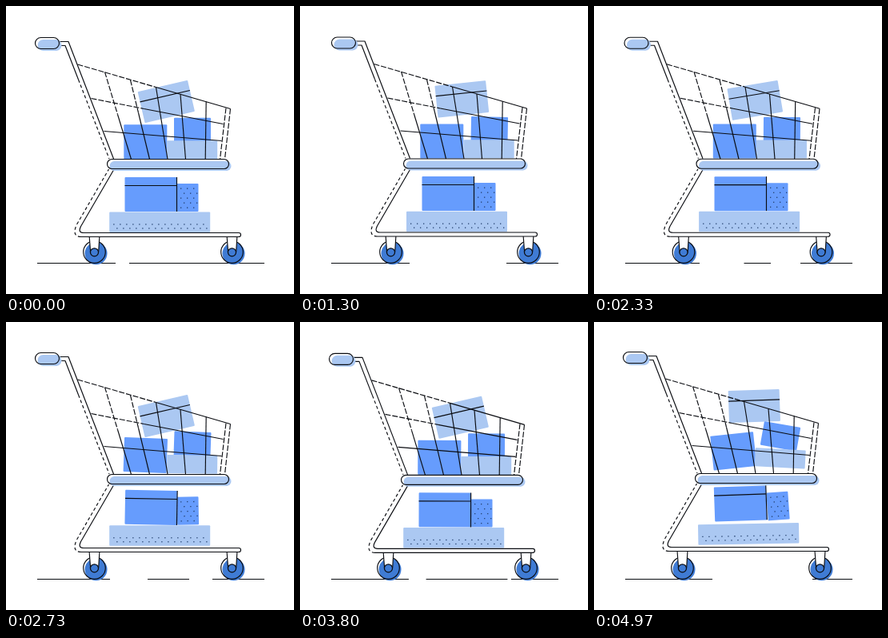
Recreate the animation shown at these times as an HTML page with a canvas. Size 360x360 px, loop 5 s.

```html
<!DOCTYPE html>
<html>
<head>
<meta charset="utf-8">
<style>
html, body { margin: 0; height: 100%; overflow: hidden; background: #fff }
canvas { display: block; width: 360px; height: 360px }
</style>
</head>
<body>
<canvas id="stage" width="360" height="360"></canvas>
<script>
const g = document.getElementById('stage').getContext('2d');
const INK = '#0b0d12', LIGHT = '#abc8f2', MID = '#669cfd', DARK = '#3f7bd4';
const LOOP = 5000, STEP = 40, CYCLE = 24;
const KEYS = [0, 4, 8, 12, 18, 20, 24];
const DASH = [7, 2], DOTTED = [4, 3];

// Eased value at beat b; each list has one value per key and wraps around
function tween(b, v) {
  let i = 0;
  while (b >= KEYS[i + 1]) i++;
  const u = (b - KEYS[i]) / (KEYS[i + 1] - KEYS[i]);
  const next = v[(i + 1) % v.length];
  return v[i] + (next - v[i]) * u * u * (3 - 2 * u);
}

// dx, dy and turn (degrees) follow the keys
const boxes = [
  { x: 200.3, y: 119.5, w: 64, h: 40, fill: LIGHT, strap: -7,
    dx: [0, 0, -1, 0, 0, 0], dy: [0, -14.5, -3.2, 0, -3, -2], turn: [-13, -2, -6, -13, -13, -13] },
  { x: 174.3, y: 169.8, w: 54, h: 43, fill: MID,
    dx: [0, 0, 0, 0, 0, 0], dy: [0, -8.5, -.7, -.7, -4.2, -3.3], turn: [0, -6, 0, 0, 3, 2] },
  { x: 233, y: 154.8, w: 46, h: 30, fill: MID,
    dx: [0, 0, .8, 0, .3, 0], dy: [0, -12, -1.3, -.5, -3.5, -2.7], turn: [0, 10, 1, 0, 3, 2] },
  { x: 232.7, y: 179.8, w: 63, h: 23, fill: LIGHT,
    dx: [0, 0, .5, 0, -.5, 0], dy: [0, -9.5, -1, -.5, -3, -2], turn: [0, 3, 0, 0, 1, .7] },
  { x: 192.2, y: 270.3, w: 126, h: 25.5, fill: LIGHT, dots: [[-58, 2], [-54, 7]], count: 15,
    dx: [0, 1, .8, 0, 0, 0], dy: [0, -5.5, -.8, -.7, -3.5, -3.2], turn: [0, -1, 0, 0, 0, 0] },
  { x: 227, y: 239.5, w: 27, h: 35, fill: MID, dots: [[-9, -12], [-5, -6], [-9, 0], [-5, 6], [-9, 12]], count: 3,
    dx: [0, 3, 1, 0, .5, .3], dy: [0, -9.5, -1, -.7, -4.5, -3.5], turn: [0, -4, 0, 0, -2, -1] },
  { x: 181, y: 235.5, w: 65, h: 43, fill: MID, strap: -11, edge: true,
    dx: [0, 2, 1, 0, .5, .3], dy: [0, -8.5, -1, -.7, -4.5, -3.6], turn: [0, -2, 0, 0, 2, 1] }
];
const shiftX = [0, 0, 3, 0, 0, 0];
const lift = [0, -2, -.5, 0, -1, -1];
const ground = {
  leftEnd: [137, 148, 137, 127, 124, 130],
  midStart: [154, 210, 210, 165, 203, 177],
  midEnd: [265, 210, 210, 232, 203, 229],
  rightStart: [265, 273, 258, 258, 273, 258]
};

function line(points, dash = [], width = 1.15) {
  g.beginPath();
  points.forEach(([x, y]) => g.lineTo(x, y));
  g.setLineDash(dash);
  g.lineWidth = width;
  g.stroke();
  g.setLineDash([]);
}

function shape(path, fill, stroke) {
  g.beginPath();
  path();
  if (fill) { g.fillStyle = fill; g.fill(); }
  if (stroke) { g.lineWidth = 1.15; g.stroke(); }
}

const circle = (x, y, r, fill, stroke) => shape(() => g.arc(x, y, r, 0, 7), fill, stroke);

function pill(x, y, w, h) {
  const body = () => g.roundRect(x, y, w, h, h / 2);
  shape(body, '#fff');
  shape(() => g.roundRect(x + 3, y + 2.5, w, h, h / 2), LIGHT);
  shape(body, null, true);
}

function drawBox(o, b) {
  const { w, h } = o;
  g.save();
  g.translate(o.x + tween(b, o.dx), o.y + tween(b, o.dy));
  g.rotate(tween(b, o.turn) * Math.PI / 180);
  shape(() => g.roundRect(-w / 2, -h / 2, w, h, 1), o.fill);
  if (o.strap) line([[-w / 2, o.strap], [w / 2, o.strap]]);
  if (o.edge) line([[w / 2, -h / 2], [w / 2, h / 2]]);
  g.fillStyle = '#24406e';
  for (const [x, y] of o.dots || [])
    for (let i = 0; i < o.count; i++)
      if (x + i * 8 < w / 2 - 2) g.fillRect(x + i * 8, y, 1.3, 1.3);
  g.restore();
}

function drawWheel(x) {
  circle(x + 2, 309.3, 14, DARK);
  circle(x, 307.5, 13.8, null, true);
  shape(() => {
    g.moveTo(x - 6.5, 286);
    g.lineTo(x - 5, 306);
    g.arc(x, 307, 5.2, Math.PI, 0, true);
    g.lineTo(x + 6.5, 286);
  }, '#fff', true);
  circle(x, 307.8, 5, DARK, true);
}

function drawLowerFrame() {
  const outer = () => {
    g.lineTo(94, 288.5);
    g.quadraticCurveTo(82, 288.5, 88, 274);
    g.lineTo(128.5, 204);
  };
  const inner = () => {
    g.lineTo(134.5, 205);
    g.lineTo(93.5, 275.5);
    g.quadraticCurveTo(89.5, 283.5, 97, 283.5);
    g.lineTo(291, 283.5);
    g.arc(291, 286, 2.5, -Math.PI / 2, Math.PI / 2);
    g.lineTo(94, 288.5);
  };
  shape(() => { inner(); outer(); }, '#fff');
  shape(inner, null, true);
  g.setLineDash(DOTTED);
  shape(outer, null, true);
  g.setLineDash([]);
}

function drawBasket() {
  g.save();
  g.translate(.5, .5);
  line([[89, 72.5], [187, 101]], DASH);
  line([[187, 101], [280, 128]]);
  line([[106, 115], [172, 128]], DASH);
  line([[172, 128], [271, 147]]);
  line([[122, 156], [269, 168]]);
  line([[123, 82], [139, 135]], DASH);
  line([[139, 135], [156, 191]]);
  line([[155, 92], [165, 133]], DASH);
  line([[165, 133], [179, 191]]);
  line([[187, 101], [201.5, 191]]);
  line([[217.5, 110], [224, 191]]);
  line([[249.7, 119], [248.7, 191]]);
  line([[274.5, 127], [267, 191]], DASH);
  line([[280, 128], [273, 191]], DASH);
  g.restore();
}

function drawPole() {
  shape(() => {
    g.moveTo(66, 44.5);
    g.lineTo(78, 44.5);
    g.lineTo(134.5, 191);
    g.lineTo(129, 191);
    g.lineTo(74, 49.5);
    g.lineTo(66, 49.5);
  }, '#fff');
  line([[66, 44.5], [78, 44.5], [134.5, 191]]);
  line([[66, 49.5], [74, 49.5], [90.5, 92]]);
  line([[90.5, 92], [129, 191]], DOTTED);
}

function drawGround(b) {
  const at = name => tween(b, ground[name]);
  const part = (from, to) => to > from + 1 && line([[from, 321.5], [to, 321.5]]);
  part(39, at('leftEnd'));
  part(at('midStart'), at('midEnd'));
  part(at('rightStart'), 323);
}

function draw() {
  const b = Math.floor(performance.now() % LOOP / STEP) % CYCLE;
  g.fillStyle = '#fff';
  g.fillRect(0, 0, 360, 360);
  g.strokeStyle = INK;
  g.lineJoin = 'round';
  drawGround(b);
  g.save();
  g.translate(tween(b, shiftX), 0);
  drawWheel(110.5);
  drawWheel(282.5);
  boxes.forEach(o => drawBox(o, b));
  g.translate(0, tween(b, lift));
  drawLowerFrame();
  drawPole();
  drawBasket();
  pill(126.5, 191.5, 152, 12);
  pill(36.5, 39.5, 30, 14);
  g.restore();
  requestAnimationFrame(draw);
}
draw();
</script>
</body>
</html>
```
